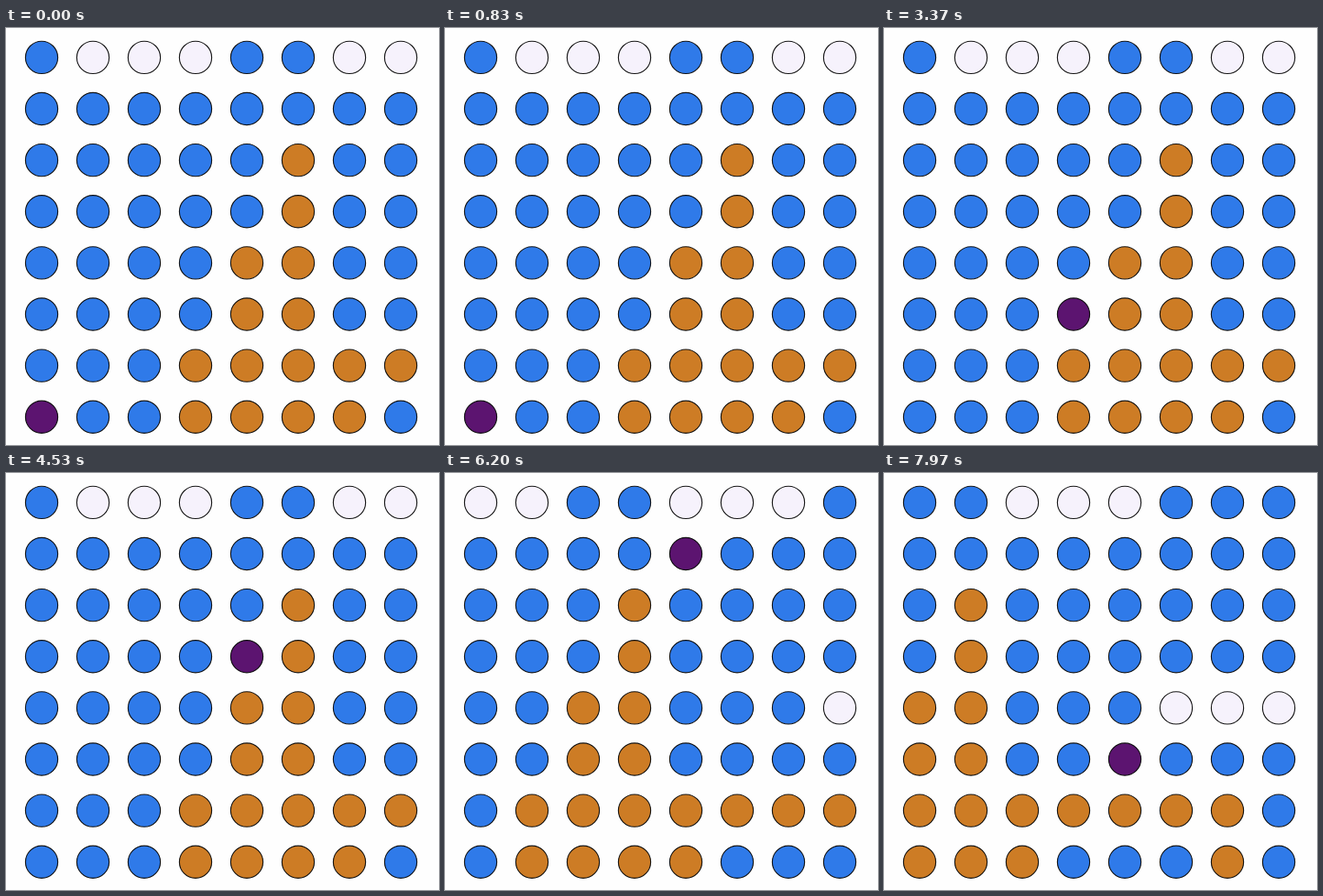
An HTML page for the animation above (8000 ms loop, 498 by 480 pixels).

```html
<!DOCTYPE html>
<html lang="en">
<head>
<meta charset="utf-8">
<title>Dot platformer</title>
<style>
  html, body { margin: 0; width: 100%; height: 100%; overflow: hidden; background: #fefefe; }
  svg { display: block; width: 498px; height: 480px; }
  circle { stroke: #0c0c0c; stroke-width: 1.1; }
</style>
</head>
<body>
<svg id="stage" viewBox="0 0 498 480"></svg>
<script>
const SIZE = 8;
const PITCH_X = 59;
const PITCH_Y = 59.12;
const LOOP = 8000;
const COLORS = { sky: '#2f7ae9', ground: '#cd7c25', cloud: '#f6f2fc', player: '#5c1470' };

// One string per row of the level: c = cloud, g = ground, . = sky
const LEVEL = [
  '.ccc..ccc...',
  '............',
  '.....g......',
  '.....g......',
  '....gg...ccc',
  '....gg......',
  '...gggggggg.',
  '...gggg...g.',
];
const TILES = { c: 'cloud', g: 'ground', '.': 'sky' };

// Player column in the level and row on screen, one entry per move
const MOVES = [
  [0, 7], [1, 7], [2, 7], [2, 5], [3, 5], [3, 3], [4, 3],
  [4, 1], [5, 1], [6, 1], [6, 5], [7, 5], [8, 5],
];
const FIRST_MOVE = 1180;
const MOVE_TIME = 598;
const MAX_COLUMN = 4;

const stage = document.getElementById('stage');

function makeDot(index) {
  const dot = document.createElementNS('http://www.w3.org/2000/svg', 'circle');
  dot.setAttribute('cx', 41 + (index % SIZE) * PITCH_X);
  dot.setAttribute('cy', 33.9 + Math.floor(index / SIZE) * PITCH_Y);
  dot.setAttribute('r', 18.6);
  return stage.appendChild(dot);
}

const dots = Array.from({ length: SIZE * SIZE }, (_, i) => makeDot(i));

function draw(step) {
  const [column, playerRow] = MOVES[step];
  const scroll = Math.max(0, column - MAX_COLUMN);
  dots.forEach((dot, i) => {
    const x = i % SIZE + scroll;
    const y = Math.floor(i / SIZE);
    const kind = x === column && y === playerRow ? 'player' : TILES[LEVEL[y][x]];
    dot.setAttribute('fill', COLORS[kind]);
  });
}

let shown = -1;
const start = performance.now();

function tick(now) {
  const time = Math.max(0, now - start) % LOOP;
  const count = Math.floor((time - FIRST_MOVE) / MOVE_TIME) + 1;
  const step = Math.min(MOVES.length - 1, Math.max(0, count));
  if (step !== shown) draw(shown = step);
  requestAnimationFrame(tick);
}

tick(start);
</script>
</body>
</html>
```
